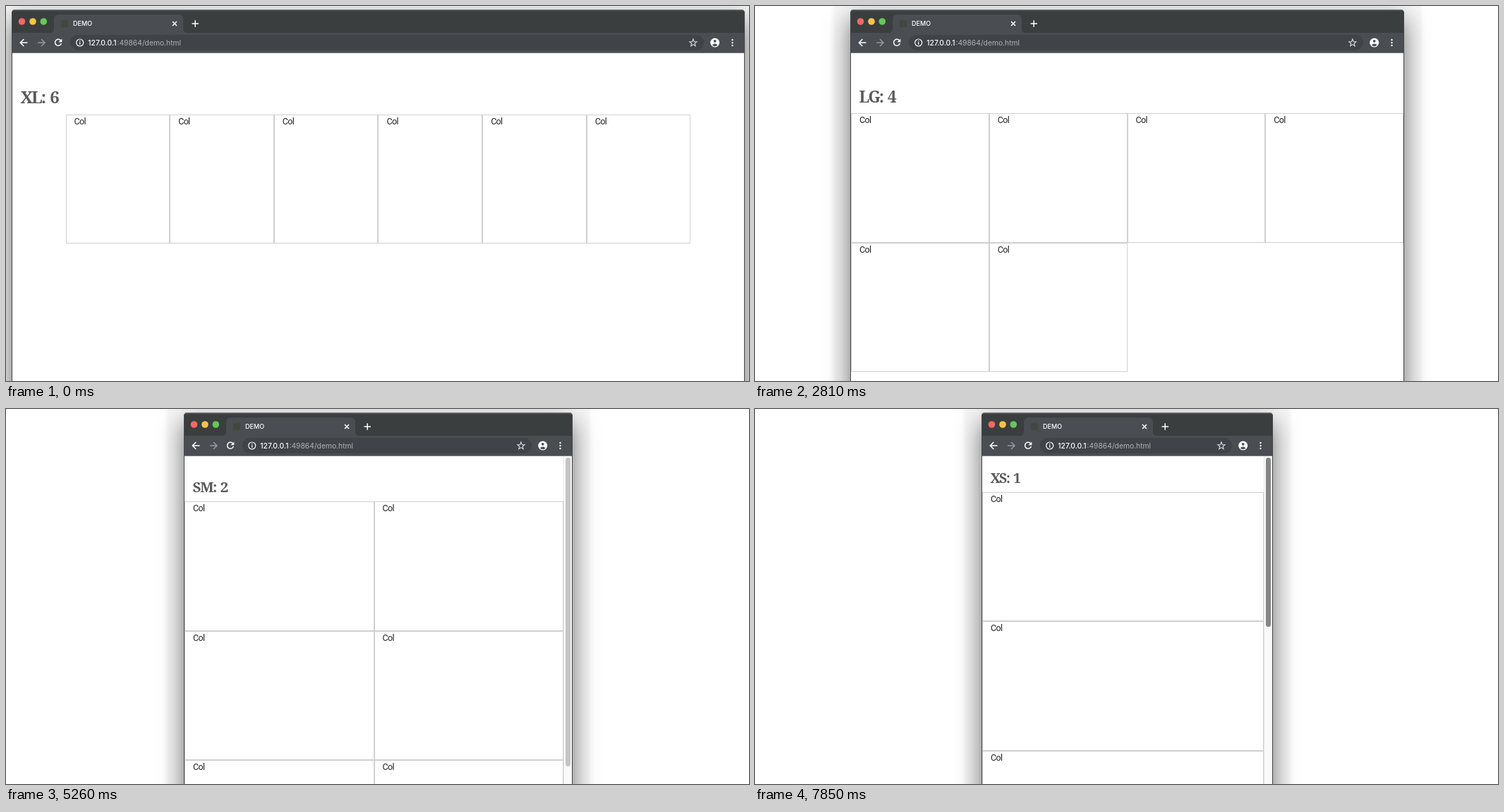
An HTML page that plays this animation: 1053x532 px, repeating every 8000 ms.

```html
<!DOCTYPE html>
<html lang="en">
<head>
<meta charset="utf-8">
<title>Responsive columns</title>
<style>
  html, body { margin: 0; width: 100%; height: 100%; overflow: hidden; background: #fff; }
  body { position: relative; }
  #win { position: absolute; top: 5px; height: 590px; border-radius: 5px;
    box-shadow: 0 14px 34px rgba(0,0,0,.56), 0 4px 4px 25px rgba(0,0,0,.04); }
  #win::after { content: ""; position: absolute; inset: 0; border: 1px solid #454647;
    border-top-color: #6b6e6f; border-radius: 5px; }
  .clip { position: absolute; inset: 0; overflow: hidden; border-radius: 5px; background: #fff; }
  .view { position: absolute; inset: -5px 0 0; }
  svg { position: absolute; left: .4px; top: 0; width: 100%; height: 67px; overflow: visible; }
  svg text { font-family: Inter, "Open Sans", sans-serif; }
  .line { fill: none; stroke: #fff; stroke-width: 1.5; }
  #pill { position: absolute; left: 83px; right: 58px; top: 41px; height: 22px; border-radius: 11px; background: #404347; }
  .bar { position: absolute; left: 0; right: 0; }
  h1 { position: absolute; left: 12.5px; margin: 0; line-height: 30px; white-space: nowrap; color: #5a5a5a;
    font-family: "Noto Serif", "DejaVu Serif", serif; font-weight: 700; letter-spacing: -.08em; word-spacing: .12em; }
  #grid { position: absolute; display: flex; flex-wrap: wrap; }
  #grid div { box-sizing: border-box; height: 183.4px; border: 1px solid #d0d0d0; padding: 1px 0 0 11px;
    font: 12.5px/16px Roboto, "Liberation Sans", sans-serif; letter-spacing: -.65px; color: #222; }
  #track { position: absolute; right: 0; top: 67px; bottom: 0; width: 12px; background: #fafafa; border-left: 1px solid #e4e4e4; }
  #thumb { position: absolute; left: 2px; top: 2px; width: 7px; border-radius: 4px; }
</style>
</head>
<body>
<div id="win">
  <div class="clip"><div class="view">
    <div class="bar" style="top:5px;height:33px;background:#3a3e3f;box-shadow:inset 0 2px #505455"></div>
    <div class="bar" style="top:38px;height:28px;background:#4a4d52;border-bottom:1px solid #7b7d80"></div>
    <div id="pill"></div>
    <svg>
      <circle cx="14.5" cy="22" r="4.8" fill="#f4695f"/>
      <circle cx="30" cy="22" r="4.8" fill="#fac24b"/>
      <circle cx="45.3" cy="22" r="4.8" fill="#62ca56"/>
      <path d="M54 38q6 0 6-6V19q0-7 7-7H236q7 0 7 7V32q0 6 6 6Z" fill="#4a4d52"/>
      <rect x="70" y="20" width="10" height="10" fill="#44463f"/>
      <text x="87" y="28.3" font-size="9" font-weight="500" fill="#fff">DEMO</text>
      <path class="line" d="M228 22l6 6m0-6l-6 6M255.5 25h9.500M260.200 20.300v9.500"/>
      <path class="line" d="M22.500 52H12.500M17.300 47L12.300 52l5 5"/>
      <path class="line" style="stroke:#96989b" d="M37 52H47M42 47l5 5-5 5"/>
      <path class="line" d="M70 49.500A4.500 4.500 0 1 0 70.400 53"/>
      <path d="M71.300 46.500v4.800h-4.800Z" fill="#fff"/>
      <circle class="line" cx="96.700" cy="52" r="5" style="stroke-width:1.2"/>
      <path class="line" style="stroke-width:1.3" d="M96.700 51.300v3.400M96.700 49v1.300"/>
      <text x="108.3" y="55.7" font-size="10.3" font-weight="500" fill="#fff">127.0.0.1</text>
      <text x="149.5" y="55.7" font-size="10.3" fill="#b0b2b5">:49864/demo.html</text>
      <g id="right">
        <path id="star" class="line" style="stroke-width:1.1;stroke:#dcdde0"/>
        <circle cx="-41.5" cy="52" r="6.5" fill="#fff"/>
        <circle cx="-41.5" cy="49.8" r="1.9" fill="#4a4d52"/>
        <path d="M-45.400 55.500q3.900-4 7.800 0q-3.900 3.400-7.800 0Z" fill="#4a4d52"/>
        <g fill="#fff"><circle cx="-16.7" cy="48" r="1.2"/><circle cx="-16.7" cy="52" r="1.2"/><circle cx="-16.7" cy="56" r="1.2"/></g>
      </g>
    </svg>
    <h1 id="head"></h1>
    <div id="grid"></div>
    <div id="track"><div id="thumb"></div></div>
  </div></div>
</div>
<script>
const $ = id => document.getElementById(id);
const LOOP = 8000, STEP = 70, START = 500, MIRROR = 1055, MAX_GRID = 886;

// left window edge over time; the right edge mirrors it
const keys = [[430, 8], [1270, 90], [1410, 97], [1760, 134], [1970, 135], [2460, 135], [2810, 135.4],
  [3300, 177], [3440, 179.5], [3860, 179.5], [4560, 211], [4700, 215], [5050, 246], [5260, 252],
  [5330, 252], [6170, 285], [6590, 302], [7010, 320], [7150, 321], [8000, 321]];

// smallest window width, label, columns, space above the heading, thumb height
const layouts = [
  { min: 932, name: 'XL', cols: 6, base: 144.3 },
  { min: 771, name: 'LG', cols: 4, base: 144.3 },
  { min: 597, name: 'MD', cols: 3, base: 126 },
  { min: 448, name: 'SM', cols: 2, base: 125.7, thumb: 438 },
  { min: 0, name: 'XS', cols: 1, base: 113.8, thumb: 240 }
];

const slope = i => (keys[i + 1][1] - keys[i][1]) / (keys[i + 1][0] - keys[i][0]);
function tangent(i) {
  if (i === 0 || i === keys.length - 1) return 0;
  const a = slope(i - 1), b = slope(i);
  return a * b > 0 ? 2 * a * b / (a + b) : 0;
}

// monotone cubic through the keys
function leftEdge(t) {
  if (t <= keys[0][0]) return keys[0][1];
  const i = Math.min(keys.findIndex(k => k[0] > t) - 1, keys.length - 2);
  const [t0, a] = keys[i], [t1, b] = keys[i + 1];
  const d = t1 - t0, u = (t - t0) / d, v = 1 - u;
  return v * v * ((1 + 2 * u) * a + u * d * tangent(i)) + u * u * ((3 - 2 * u) * b - v * d * tangent(i + 1));
}

$('star').setAttribute('d', 'M' + Array.from({ length: 10 }, (_, i) => {
  const r = i % 2 ? 2.3 : 5.4, a = i * Math.PI / 5;
  return (-72.3 + r * Math.sin(a)).toFixed(2) + ' ' + (52.3 - r * Math.cos(a)).toFixed(2);
}).join('L') + 'Z');
$('grid').innerHTML = '<div>Col</div>'.repeat(6);

function draw(t) {
  if (t >= START) t = START + Math.floor((t - START) / STEP) * STEP;
  const left = Math.round(leftEdge(t)), width = MIRROR - 2 * left;
  const lay = layouts.find(l => width >= l.min);
  const capped = Math.min(width, 932);
  const top = lay.base + .0102 * capped;
  const room = width - 2 - (lay.thumb ? 12 : 0);
  const gridWidth = lay.name === 'XL' ? MAX_GRID : room;

  $('win').style.left = left + 'px';
  $('win').style.width = width + 'px';
  $('right').setAttribute('transform', `translate(${width - .8})`);

  const head = $('head'), size = 16 + .0085 * capped;
  head.textContent = lay.name + ': ' + lay.cols;
  head.style.fontSize = size + 'px';
  head.style.top = top - 15.7 - size + 'px';

  const grid = $('grid');
  grid.style.left = 1 + (room - gridWidth) / 2 + 'px';
  grid.style.top = top + 'px';
  grid.style.width = gridWidth + 'px';
  for (const cell of grid.children) cell.style.width = 100 / lay.cols + '%';

  $('track').style.display = lay.thumb ? 'block' : 'none';
  $('thumb').style.height = (lay.thumb || 0) + 'px';
  $('thumb').style.background = t >= 7850 ? '#858585' : t >= 7780 ? '#a3a3a3' : '#c4c4c4';
}

const begin = performance.now();
function tick() {
  draw((performance.now() - begin) % LOOP);
  requestAnimationFrame(tick);
}
tick();
</script>
</body>
</html>
```
